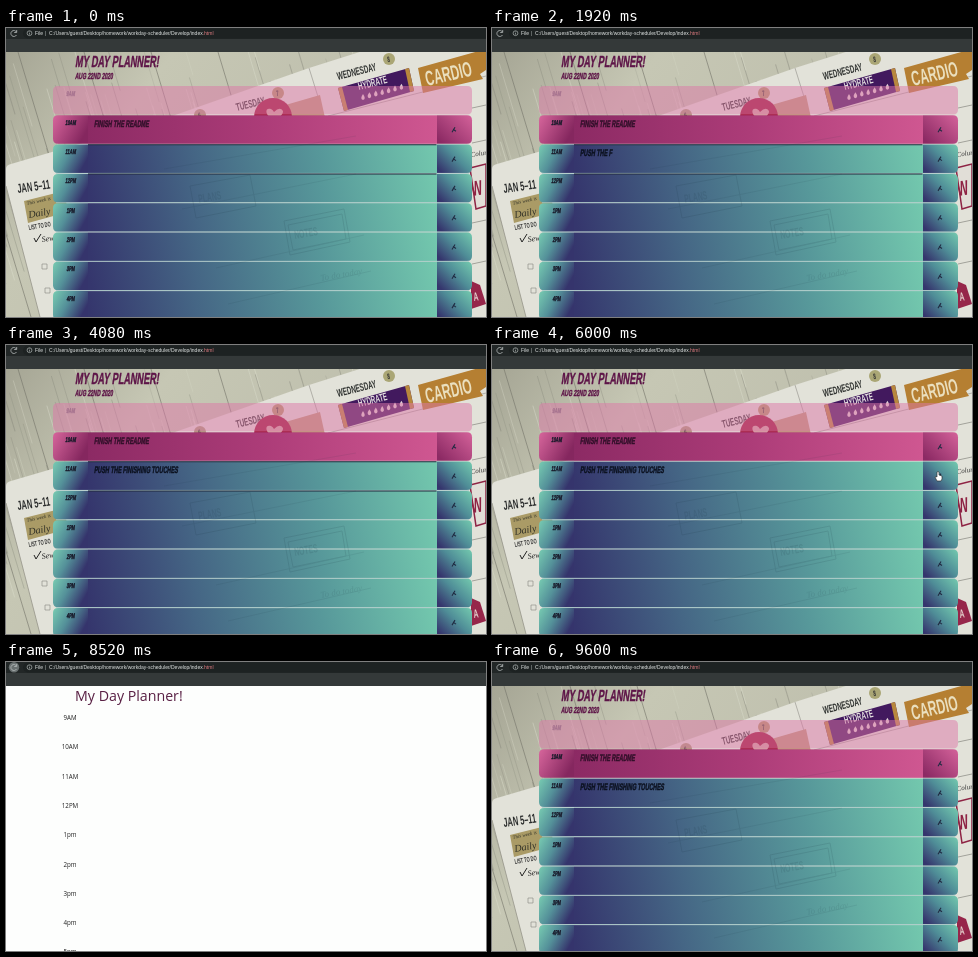
Animation of 480x289 px, one loop 9720 ms. Source, as an HTML page:

```html
<!DOCTYPE html>
<html lang="en">
<head>
<meta charset="utf-8">
<title>Day planner</title>
<style>
html, body { margin: 0; width: 100%; height: 100%; overflow: hidden; background: #fff; }
svg { display: block; width: 100%; height: 100%; }
text { white-space: pre; }
.comic, .print { font-family: "Liberation Sans", Arial, sans-serif; font-weight: 700; }
.comic { stroke: currentColor; stroke-width: .45; }
.ui { font-family: "Liberation Sans", Arial, sans-serif; }
.plain { font-family: "Open Sans", Lato, sans-serif; }
.hand { font-family: "Liberation Serif", "Noto Serif", serif; font-style: italic; }
</style>
</head>
<body>
<svg id="stage" viewBox="0 0 480 289" preserveAspectRatio="none">
  <defs>
    <linearGradient id="wood" x2="1" y2="0.4">
      <stop stop-color="#a5a594"/><stop offset=".3" stop-color="#c6c7b4"/><stop offset="1" stop-color="#b9b9a8"/>
    </linearGradient>
    <linearGradient id="future" gradientUnits="userSpaceOnUse" x1="84" y1="20" x2="424" y2="-60">
      <stop stop-color="#35366d"/><stop offset=".3" stop-color="#456685"/>
      <stop offset=".65" stop-color="#57989a"/><stop offset="1" stop-color="#75cbaf"/>
    </linearGradient>
    <linearGradient id="futureHour" x2="1" y2=".45">
      <stop stop-color="#78ccb2"/><stop offset=".5" stop-color="#549099"/><stop offset="1" stop-color="#35346c"/>
    </linearGradient>
    <linearGradient id="futureSave" x1="1" y1="0" x2="0" y2=".8">
      <stop stop-color="#74caaf"/><stop offset=".5" stop-color="#4f8d97"/><stop offset="1" stop-color="#35356d"/>
    </linearGradient>
    <linearGradient id="present" x2="1">
      <stop stop-color="#8c2a64"/><stop offset=".5" stop-color="#ac3c78"/><stop offset="1" stop-color="#cf5791"/>
    </linearGradient>
    <linearGradient id="presentHour" x2="1" y2=".45">
      <stop stop-color="#d7669c"/><stop offset="1" stop-color="#85275f"/>
    </linearGradient>
    <linearGradient id="presentSave" x1="1" y1="0" x2="0" y2=".8">
      <stop stop-color="#d4629a"/><stop offset="1" stop-color="#8c2a64"/>
    </linearGradient>
    <clipPath id="page"><rect y="24" width="480" height="265"/></clipPath>
  </defs>
  <g id="styled" clip-path="url(#page)">
    <g id="desk"></g>
    <g id="planner"></g>
  </g>
  <g id="unstyled"></g>
  <g id="chrome"></g>
  <g id="arrow"><path d="M0 0V9L2.1 7L3.6 10.3L5 9.7L3.5 6.5H6.3Z" fill="#fff" stroke="#222" stroke-width=".6"/></g>
  <g id="pointer"><path d="M-1 -4Q0 -5 1 -4V-1L4 0V3L3 5H-1L-3 1Q-2 0 -1 1Z" fill="#fff" stroke="#222" stroke-width=".6"/></g>
</svg>
<script>
const LOOP = 9720;
const ROW_TOP = 58, ROW_STEP = 29.3;
const HOURS = ["9AM", "10AM", "11AM", "12PM", "1PM", "2PM", "3PM", "4PM"];
const TASK = "PUSH THE FINISHING TOUCHES";
const $ = id => document.getElementById(id);

function add(parent, tag, attrs, content = "") {
  const node = document.createElementNS("http://www.w3.org/2000/svg", tag);
  for (const key in attrs) node.setAttribute(key, attrs[key]);
  node.textContent = content;
  return parent.appendChild(node);
}

const shape = (parent, d, fill, extra = {}) => add(parent, "path", { d, fill, ...extra });
const line = (parent, d, stroke, width = 1, extra = {}) =>
  shape(parent, d, "none", { stroke, "stroke-width": width, ...extra });
const rect = (parent, x, y, width, height, fill, extra = {}) =>
  add(parent, "rect", { x, y, width, height, fill, ...extra });
const disc = (parent, cx, cy, r, fill) => add(parent, "circle", { cx, cy, r, fill });

// Both narrow lettering styles share one condensing factor.
function write(parent, x, y, size, content, fill, style = "comic", angle = 0, anchor = "start") {
  const slant = style === "comic" ? "skewX(-8)" : "";
  const narrow = style === "comic" || style === "print" ? "scale(.57 1)" : "";
  return add(parent, "text", {
    class: style, fill, color: fill, "font-size": size, "text-anchor": anchor,
    transform: `translate(${x} ${y}) rotate(${angle}) ${slant} ${narrow}`
  }, content);
}

function randomizer(seed) {
  return () => (seed = (seed * 16807) % 2147483647) / 2147483647;
}

function drawDesk() {
  const g = $("desk"), random = randomizer(41);
  rect(g, 0, 24, 480, 265, "url(#wood)");
  for (let i = 0; i < 240; i++) {
    const x = random() * 430 - 80, y = 10 + random() * 220, length = 25 + random() * 80;
    line(g, `M${x} ${y}l${length * .3} ${length}`, random() < .55 ? "#85867a" : "#dedfcf",
      .4 + random() * .7, { opacity: .45 });
  }
  for (const x of [-55, 12, 78, 145, 212])
    line(g, `M${x} 24l80 265`, "#77776b", .9, { opacity: .7 });

  // Open planner pages
  shape(g, "M0 141Q0 137 5 136L155 92L303 40L360 22H480V289H34L0 158Z", "#e2e2d9");
  line(g, "M0 158L34 289", "#969589", .8);
  line(g, "M303 40L318 88M322 88L480 48", "#9b9a92", .7);

  write(g, 12, 165, 13, "JAN 5–11", "#292b2b", "print", -8);
  shape(g, "M18 173L58 163L62 184L22 195Z", "#aa9b66");
  write(g, 21, 177, 5, "This week is", "#303026", "hand", -12);
  write(g, 23, 190, 10, "Daily", "#303026", "hand", -10);
  write(g, 23, 202, 7, "LIST TO DO", "#333", "print", -10);
  line(g, "M28 210l2 4l5 -8", "#222", 1);
  write(g, 36, 214, 8, "Sew", "#222", "hand", -8);
  line(g, "M36 236h5v5h-5zM39 260h5v5h-5z", "#85857f", .6);

  write(g, 231, 83, 11, "TUESDAY", "#323432", "print", -14);
  shape(g, "M276 78L314 67L319 90H276Z", "#bd9a78");
  disc(g, 272, 65, 6, "#b29868");
  write(g, 272, 68, 8, "7", "#303030", "print", -10, "middle");
  disc(g, 194, 87, 6, "#a99c78");
  write(g, 194, 90, 8, "6", "#303030", "print", -10, "middle");
  disc(g, 267, 89, 19, "#9c1638");
  shape(g, "M267 92C258 86 259 79 265 81Q267 82 268 84Q274 78 277 83Q278 88 267 92Z", "#d2a3a0");

  write(g, 332, 52, 11, "WEDNESDAY", "#303331", "print", -14);
  disc(g, 383, 31, 6, "#aaa675");
  write(g, 383, 34, 8, "8", "#303030", "print", -10, "middle");
  shape(g, "M332 60L403 40L408 63L338 83Z", "#42195e");
  shape(g, "M332 60L336 59L342 82L338 83Z", "#b7873d");
  shape(g, "M399 41L403 40L408 63L404 64Z", "#b7873d");
  write(g, 353, 62, 11, "HYDRATE", "#e3dfdf", "print", -14);
  for (let i = 0; i < 7; i++)
    shape(g, `M${357 + i * 6.4} ${66 - i * 1.7}q-3.5 5 0 6q3.5 -1 0 -6`, "#e0cfd4");
  shape(g, "M412 40L480 21V42L474 46L477 51L417 65Z", "#b57f32");
  write(g, 421, 58, 21, "CARDIO", "#eadfbe", "print", -13);

  // Narrow strip beside the save buttons
  line(g, "M466 80L480 77M466 115L480 112M466 195L480 192M466 236L480 233", "#92928b", .8);
  write(g, 465, 129, 7, "Column", "#333", "hand", -8);
  shape(g, "M464 140L480 136V178L470 181Z", "#e1ded7", { stroke: "#8e2344", "stroke-width": 1.5 });
  write(g, 466, 168, 21, "W", "#8e2344", "print", -8);
  shape(g, "M465 253L474 257L480 276L465 281Z", "#96264a");
  write(g, 468, 273, 12, "A", "#e5d2ce", "print", -8);
}

function drawRow(g, hour, index) {
  const y = ROW_TOP + index * ROW_STEP, height = ROW_STEP - .8;
  const past = index === 0, future = index > 1;
  const tone = future ? "future" : "present";
  const row = add(g, "g", { transform: `translate(0 ${y})` });
  const body = add(row, "g", { opacity: past ? .5 : 1 });
  const fill = part => past ? "#dd78a8" : `url(#${tone}${part})`;
  shape(body, `M82 0H52Q47 0 47 5V${height - 5}Q47 ${height} 52 ${height}H82Z`, fill("Hour"));
  rect(body, 82, 0, 349, height, fill(""));
  shape(body, `M431 0H461Q466 0 466 5V${height - 5}Q466 ${height} 461 ${height}H431Z`, fill("Save"));
  if (future) line(row, `M50 ${height + .3}H463`, "#a6c9c8", .8);
  write(row, 64.5, 9.5, 7, hour, past ? "#a6738f" : "#191a2a", "comic", 0, "middle");
  if (!past) line(row, "M446 17l3 -5M447 14l3 2", "#202b42", 1.1);
}

function drawPlanner() {
  const g = $("planner");
  write(g, 69, 38.5, 16, "MY DAY PLANNER!", "#5e1548");
  write(g, 69, 51, 8.8, "AUG 22ND 2020", "#5e1548");
  HOURS.forEach((hour, i) => drawRow(g, hour, i));

  const marks = add(g, "g", { opacity: .12 });
  line(marks, "M184 158L244 147L250 178L190 190ZM278 193L338 181L344 214L284 227ZM282 197L336 186L340 211L287 222Z", "#17303e", 1);
  line(marks, "M158 141L350 108M176 181L350 146M210 240L358 207M222 276L365 243", "#17303e", .7);
  write(marks, 193, 175, 12, "PLANS", "#17303e", "print", -10);
  write(marks, 289, 211, 12, "NOTES", "#17303e", "print", -10);
  write(marks, 315, 253, 9, "To do today", "#17303e", "hand", -10);

  write(g, 88, 99, 9.5, "FINISH THE README", "#32102a");
  const task = write(g, 88, 128.3, 9.5, "", "#0c1220");
  const focus = line(g, "M82 116.7H430.5M82 146H430.5", "#20283c", 1.1);
  return { task, focus };
}

function drawUnstyled() {
  const g = $("unstyled");
  rect(g, 0, 24, 480, 265, "#fdfefd");
  write(g, 69, 39, 14.2, "My Day Planner!", "#592044", "plain");
  [...HOURS, "5PM"].forEach((hour, i) => {
    const label = i > 3 ? hour.toLowerCase() : hour;
    write(g, 64, 58 + i * ROW_STEP, 6.2, label, "#222", "plain", 0, "middle");
  });
}

function drawChrome() {
  const g = $("chrome");
  rect(g, 0, 0, 480, 24, "#343939");
  rect(g, 0, 0, 480, 11, "#222727");
  rect(g, 17, .5, 470, 10, "#1d2222", { rx: 5 });
  const hover = disc(g, 8, 5.3, 5.2, "#697070");
  line(g, "M10.5 4A3 3 0 1 0 10.5 7M10.7 2V4.5H8.2", "#b5baba", .8);
  const chip = rect(g, 18, 1, 20, 9, "#485050", { rx: 4 });
  add(g, "circle", { cx: 23.5, cy: 5.2, r: 2.4, fill: "none", stroke: "#c5cbca", "stroke-width": .6 });
  line(g, "M23.5 4.8V6.6M23.5 3.6V4.2", "#c5cbca", .6);
  write(g, 29, 7.2, 5, "File", "#e1e5e4", "ui");
  line(g, "M39.5 3V8", "#8b9291", .6);
  const address = write(g, 43, 7.2, 5, "", "#e1e5e4", "ui");
  add(address, "tspan", {}, "C:/Users/guest/Desktop/homework/workday-scheduler/Develop/index");
  add(address, "tspan", { fill: "#de7c80" }, ".html");
  return { hover, chip };
}

drawDesk();
const { task, focus } = drawPlanner();
drawUnstyled();
const { hover, chip } = drawChrome();

const show = (node, visible) => node.setAttribute("visibility", visible ? "visible" : "hidden");
const ROUTE = [
  [4560, 190, 133], [5520, 446, 131], [6240, 446, 131],
  [7080, 31, 5], [7440, 31, 5], [7920, 8, 5], [8760, 8, 5]
];

function mouseAt(time) {
  const next = ROUTE.findIndex(stop => stop[0] > time);
  if (next < 1) return null;
  const [t0, x0, y0] = ROUTE[next - 1], [t1, x1, y1] = ROUTE[next];
  const p = (time - t0) / (t1 - t0), eased = p * p * (3 - 2 * p);
  return { x: x0 + (x1 - x0) * eased, y: y0 + (y1 - y0) * eased };
}

function render(elapsed) {
  const time = Math.floor((elapsed % LOOP) / 120) * 120;
  const count = Math.floor((time - 580) / 122);
  const typed = TASK.slice(0, Math.max(0, count));
  if (task.textContent !== typed) task.textContent = typed;
  show(focus, time < 5880);

  const reloading = time >= 8400 && time < 8760;
  show($("unstyled"), reloading);
  show($("styled"), !reloading);

  const mouse = mouseAt(time);
  const onButton = mouse && mouse.x > 431;
  const onBar = mouse && mouse.y < 11;
  show($("pointer"), onButton);
  show($("arrow"), mouse && !onButton && !onBar);
  show(hover, onBar && mouse.x < 16);
  show(chip, onBar && mouse.x >= 16 && mouse.x < 40);
  if (mouse) for (const id of ["arrow", "pointer"])
    $(id).setAttribute("transform", `translate(${mouse.x} ${mouse.y})`);
}

const start = performance.now();
function tick() {
  render(performance.now() - start);
  requestAnimationFrame(tick);
}
render(0);
requestAnimationFrame(tick);
</script>
</body>
</html>
```
